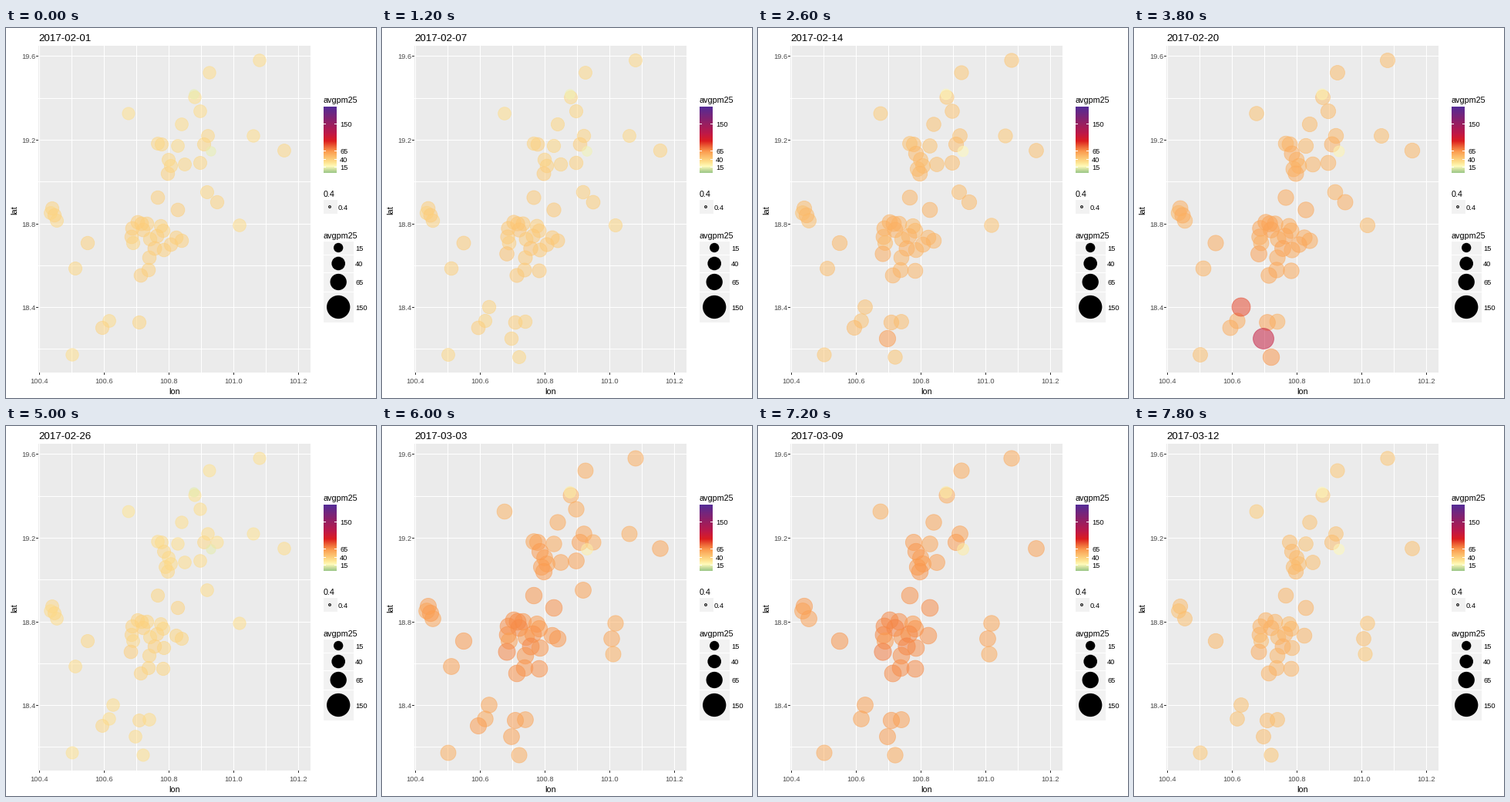
These frames come from a looping animation (480x480 px, 8 s). A matplotlib script:

```python
import numpy as np
import matplotlib.pyplot as plt
from matplotlib.animation import FuncAnimation
from matplotlib.colors import LinearSegmentedColormap
from matplotlib.patches import Circle, Rectangle

SIZE = 480
DAYS = 40
plt.rcParams["font.family"] = "Liberation Sans"

# Station positions in pixels, grouped by first and last day online
STATIONS = {
    (0, 40): [
        (329, 42), (264, 58), (245, 90), (159, 111), (228, 125), (262, 140),
        (202, 151), (223, 153), (257, 151), (361, 159), (211, 171), (214, 179),
        (210, 189), (232, 177), (197, 220), (223, 236), (60, 234), (58, 240),
        (66, 250), (303, 256), (106, 279), (171, 252), (183, 254), (178, 262),
        (164, 260), (163, 271), (165, 279), (201, 257), (204, 263), (196, 270),
        (187, 274), (193, 286), (205, 288), (221, 272), (186, 298), (185, 314),
        (175, 321), (134, 380), (173, 382), (86, 424)],
    (0, 36): [
        (252, 108), (321, 140), (197, 150), (252, 175), (261, 213), (63, 243),
        (90, 312), (176, 254), (228, 276), (125, 389)],
    (0, 22): [(274, 226), (214, 281)],
    (3, 40): [(162, 293), (204, 315), (139, 362), (186, 381), (168, 403),
              (178, 427)],
    (10, 40): [(205, 163), (207, 183)],
    (22, 36): [(274, 151)],
    (28, 40): [(298, 276), (300, 296)],
}
CLEAN = [(244, 86), (266, 160)]

# Regional level on a few days, and local fires: day, x, y, extra level
LEVELS = {0: 38, 6: 41, 13: 50, 19: 55, 25: 36, 33: 79, 39: 50}
FIRES = [(13, 168, 403, 16), (19, 168, 403, 60), (19, 139, 362, 34),
         (19, 178, 427, 15), (33, 204, 315, 58)]

CMAP = LinearSegmentedColormap.from_list("pm", [
    (0.00, "#9cc888"), (0.05, "#cfe0a0"), (0.095, "#fffbbb"), (0.15, "#fee593"),
    (0.20, "#fdd07c"), (0.325, "#fb9a4e"), (0.41, "#ea5a32"), (0.48, "#dc1e20"),
    (0.60, "#bd1848"), (0.75, "#961f62"), (1.00, "#542c96")])

XY = np.array(sum(STATIONS.values(), []) + CLEAN, float)
SPANS = [span for span, group in STATIONS.items() for _ in group]
FIRST, LAST = np.array(SPANS + [(0, 40)] * len(CLEAN)).T


def bump(x, y, width):
    return np.exp(-((XY - (x, y)) ** 2).sum(axis=1) / (2 * width ** 2))


# The valley around the town traps smoke; the hill stations stay clean
SHARE = 0.88 + 0.2 * bump(165, 262, 85)
SHARE[-len(CLEAN):] = 0.42
SHARE *= np.random.default_rng(25).normal(1, 0.035, len(XY))


def radius(level):
    return 2 + 1.074 * np.sqrt(level)


def readings(day):
    levels = SHARE * np.interp(day, list(LEVELS), list(LEVELS.values()))
    for when, x, y, extra in FIRES:
        levels += extra * np.exp(-((day - when) / 1.5) ** 2) * bump(x, y, 10)
    return levels


fig = plt.figure(figsize=(SIZE / 72, SIZE / 72), dpi=72, facecolor="white")
ax = fig.add_axes([0, 0, 1, 1])


def box(x0, y0, x1, y1, color, z=1):
    ax.add_patch(Rectangle((x0, y0), x1 - x0, y1 - y0, fc=color, lw=0,
                           antialiased=False, zorder=z))


def label(x, y, text, size=9.2, color="black", **kw):
    return ax.text(x, y, text, size=size, color=color, va="baseline", **kw)


# Panel, grid and axes
box(42, 23, 395, 447, "#ebebeb")
for i in range(9):
    x = 43 + 42 * i
    box(x, 23, x + 1, 447, "white")
    if i % 2 == 0:
        box(x, 447, x + 1, 450, "#333333")
        label(x + 0.5, 461, f"{100.4 + 0.1 * i:.1f}", color="#4d4d4d", ha="center")
for i in range(8):
    y = int(36.9 + 54.3 * i)
    box(42, y, 395, y + 1, "white")
    if i % 2 == 0:
        box(39, y, 42, y + 1, "#333333")
        label(38.5, y + 4, f"{19.6 - 0.2 * i:.1f}", color="#4d4d4d", ha="right")
label(219, 475, "lon", 10.8, ha="center")
ax.text(11.5, 236, "lat", size=10.8, rotation=90, ha="center", va="center")

# Colour legend
label(412, 97, "avgpm25", 10.8)
ax.imshow(np.linspace(1, 0, 256)[:, None], cmap=CMAP, aspect="auto",
          extent=(412, 429, 188, 102), zorder=2)
for level in (15, 40, 65, 150):
    y = round(186.5 - 0.42 * level)
    box(412, y, 415, y + 1, "white", 3)
    box(426, y, 429, y + 1, "white", 3)
    label(433, y + 4, str(level))

# Opacity legend
label(412, 219, "0.4", 10.8)
box(412, 223, 430, 241, "#f2f2f2")
ax.add_patch(Circle((420, 232), 1.5, fc=(0, 0, 0, 0.4), ec=(0, 0, 0, 0.85),
                    lw=0.9, zorder=2))
label(431, 236, "0.4")

# Size legend
label(412, 273, "avgpm25", 10.8)
box(412, 277, 451, 382, "#f2f2f2")
for y in (294, 317, 342):
    box(412, y, 451, y + 1, "white")
for level, y in ((15, 285), (40, 305.5), (65, 329.5), (150, 362)):
    ax.add_patch(Circle((431.2, y), radius(level), fc="black", lw=0, zorder=2))
    label(453, int(y) + 4, str(level))

title = label(42, 17, "", 13.4)
dots = ax.scatter(XY[:, 0], XY[:, 1], linewidths=0.9, zorder=4)
ax.set_xlim(0, SIZE)
ax.set_ylim(SIZE, 0)
ax.axis("off")


def draw(day):
    month, date = (2, day + 1) if day < 28 else (3, day - 27)
    title.set_text(f"2017-{month:02d}-{date:02d}")
    online = (FIRST <= day) & (day < LAST)
    # The clean-air group outlasts every other one
    online &= (LAST > day)
    levels = readings(day)[online]
    colors = CMAP(levels / 200)
    colors[:, 3] = 0.53
    dots.set_offsets(XY[online])
    dots.set_sizes((2 * radius(levels)) ** 2)
    dots.set_facecolors(colors)
    dots.set_edgecolors(colors)
    return dots, title


anim = FuncAnimation(fig, draw, frames=DAYS, interval=200, repeat=True)
plt.show()
```
